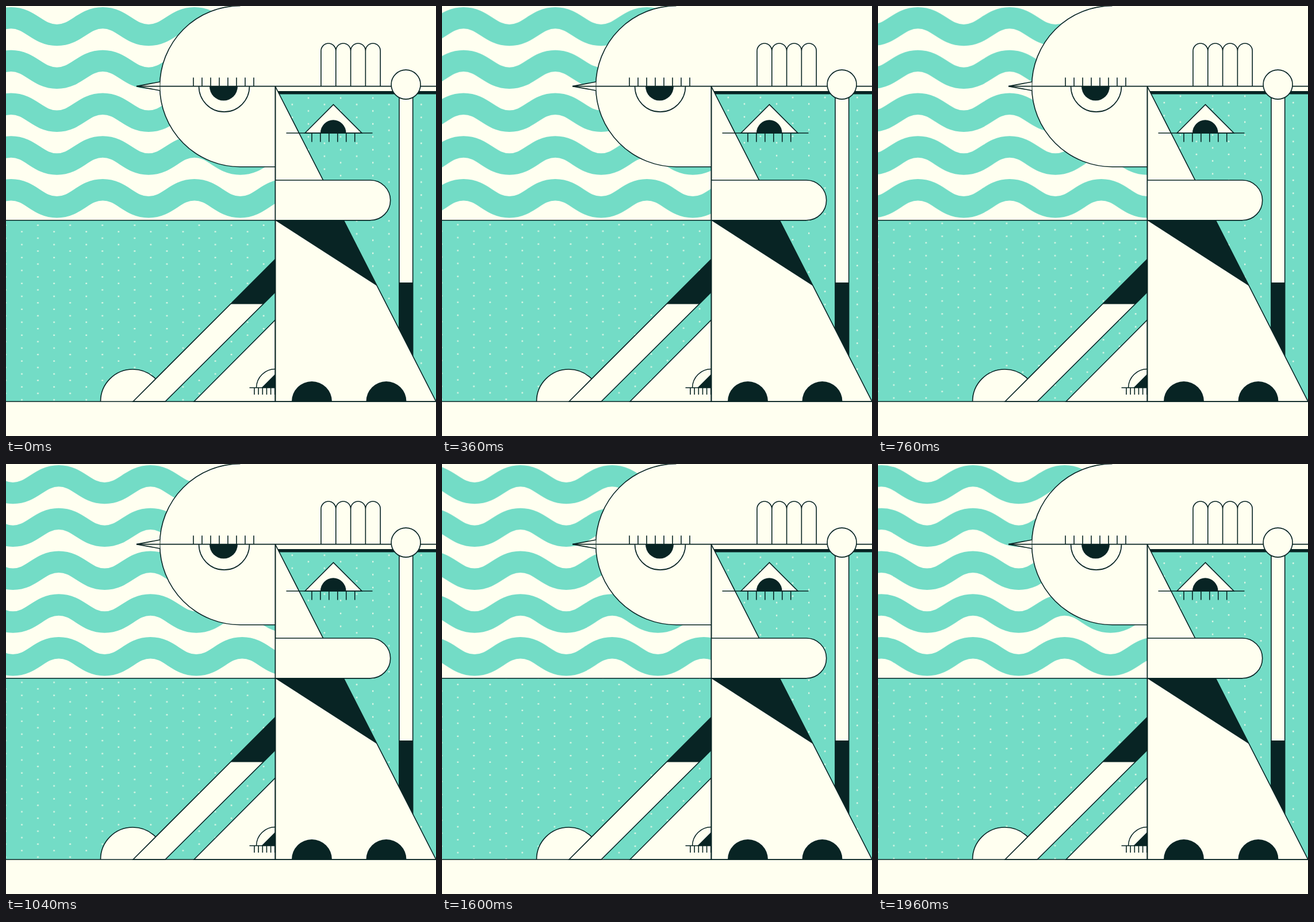
Recreate the animation shown at these times as an HTML page. Size 748 by 748 pixels, loop 2 s.

```html
<!DOCTYPE html>
<html lang="en">
<head>
<meta charset="utf-8">
<title>Figure and waves</title>
<style>
  :root { --cream: #fffff0; --teal: #73dcc6; --ink: #082424; }
  html, body { margin: 0; width: 100%; height: 100%; overflow: hidden; background: var(--cream); }
  body > svg { display: block; width: 100vw; height: 100vh; }
  .cream { fill: var(--cream); }
  .teal { fill: var(--teal); }
  .ink { fill: var(--ink); }
  .line { stroke: var(--ink); stroke-width: 1.6; }
  .bare { fill: none; }
  .band { fill: none; stroke: var(--teal); stroke-width: 37.4; }
  .waves { animation: drift 2s steps(50) infinite; }
  .dots { fill: url(#dot-tile); animation: rise 2s steps(50) infinite; }
  @keyframes drift { to { transform: translateX(159.5px); } }
  @keyframes rise { to { transform: translateY(-67.5px); } }
</style>
</head>
<body>
<svg viewBox="0 0 748 748">
  <defs>
    <pattern id="dot-tile" width="56.1" height="22.5" patternUnits="userSpaceOnUse">
      <circle class="cream" cx="14" cy="5.6" r="1.25"/>
      <circle class="cream" cx="42.05" cy="16.85" r="1.25"/>
    </pattern>
  </defs>

  <!-- sea -->
  <svg width="468" height="372.5">
    <g class="waves" id="waves"></g>
  </svg>

  <!-- dotted grounds -->
  <svg y="373" width="468.5" height="315">
    <rect class="teal" width="469" height="315"/>
    <g transform="translate(13.5 13.9)"><rect class="dots" x="-60" y="-60" width="580" height="480"/></g>
  </svg>
  <svg x="468" y="153" width="280" height="535">
    <rect class="teal" width="280" height="535"/>
    <g transform="translate(44 1.4)"><rect class="dots" x="-60" y="-60" width="340" height="700"/></g>
  </svg>

  <!-- left foot and legs -->
  <path class="cream line" d="M164.5 688a56 56 0 0 1 112 0"/>
  <path class="cream line" d="M221 688 468.5 440.5V497.5L277 688z"/>
  <path class="ink" d="M468.5 440.5V497.5L447.5 518.5H390.5z"/>
  <path class="cream line" d="M327 688 468.5 546V688z"/>
  <path class="bare line" d="M435.5 664A33 33 0 0 1 468.5 631.5M423.5 664H468.5"/>
  <path class="ink" d="M444.5 664 468.5 640V664z"/>
  <g class="line" id="small-lashes"></g>

  <!-- staff -->
  <path class="cream line" d="M684 150H707.7V640H684z"/>
  <path class="ink" d="M683.5 481H708V640H683.5z"/>

  <!-- head -->
  <path class="cream" d="M748 0H407.5A139.8 139.8 0 0 0 407.5 279.7H468.5V148H748z"/>
  <path class="ink" d="M470 148H748V153.6H470z"/>

  <!-- body -->
  <path class="cream line" d="M468.5 140 748 688H468.5z"/>
  <path class="ink" d="M468.5 373H588L645.5 487z"/>
  <path class="cream line" d="M468.5 303H633.8a34.9 34.9 0 0 1 0 69.8H468.5"/>
  <path class="ink" d="M497 688a35 35 0 0 1 70 0zM626.5 688a35 35 0 0 1 70 0z"/>

  <!-- face -->
  <path class="bare line" d="M468.5 279.7H407.5A139.8 139.8 0 0 1 407.5 -.3"/>
  <path class="cream line" d="M267.5 132 227 139.6 267.5 147"/>
  <path class="bare line" d="M335.5 139.6a44 44.5 0 0 0 88 0"/>
  <path class="ink" d="M354 139.6a24.5 25 0 0 0 49 0z"/>
  <g class="line" id="top-lashes"></g>

  <!-- raised hand -->
  <g class="cream line" id="fingers"></g>

  <!-- side eye -->
  <path class="cream line" d="M520 221 569.5 171.5 619 221z"/>
  <path class="ink" d="M547 221a22.3 22.8 0 0 1 44.6 0z"/>
  <g class="line" id="side-lashes"></g>

  <!-- long rules -->
  <path class="line" d="M227 139.6H748M487.5 221H637.5M0 372.8H634M0 688H748M468.5 139.6V688"/>
  <circle class="cream line" cx="695.6" cy="136.6" r="25.5"/>
</svg>
<script>
  const addPath = (id, d, cls = '') => {
    const path = document.createElementNS('http://www.w3.org/2000/svg', 'path');
    path.setAttribute('d', d);
    path.setAttribute('class', cls);
    document.getElementById(id).append(path);
  };
  const repeat = (n, make) => Array.from({ length: n }, (_, i) => make(i)).join('');

  const half = 79.75, bend = 34, drop = 30;
  const swing = dy => `c${bend} 0 ${half - bend} ${dy} ${half} ${dy}`;
  const wave = repeat(6, () => swing(drop) + swing(-drop));
  for (let row = 0; row < 5; row++) {
    addPath('waves', `M-310.2 ${20.6 + row * 74.8}` + wave, 'band');
  }

  const lashes = (id, n, x, gap, y, length) =>
    addPath(id, repeat(n, i => `M${x + i * gap} ${y}v${length}`));
  lashes('top-lashes', 8, 326, 15, 124.5, 15);
  lashes('side-lashes', 6, 532, 14.95, 221, 15.5);
  lashes('small-lashes', 6, 432, 7.15, 664, 12);

  addPath('fingers', repeat(4, i => `M${548 + i * 25.8} 139.6V78a12.9 13 0 0 1 25.8 0V139.6`));
</script>
</body>
</html>
```
